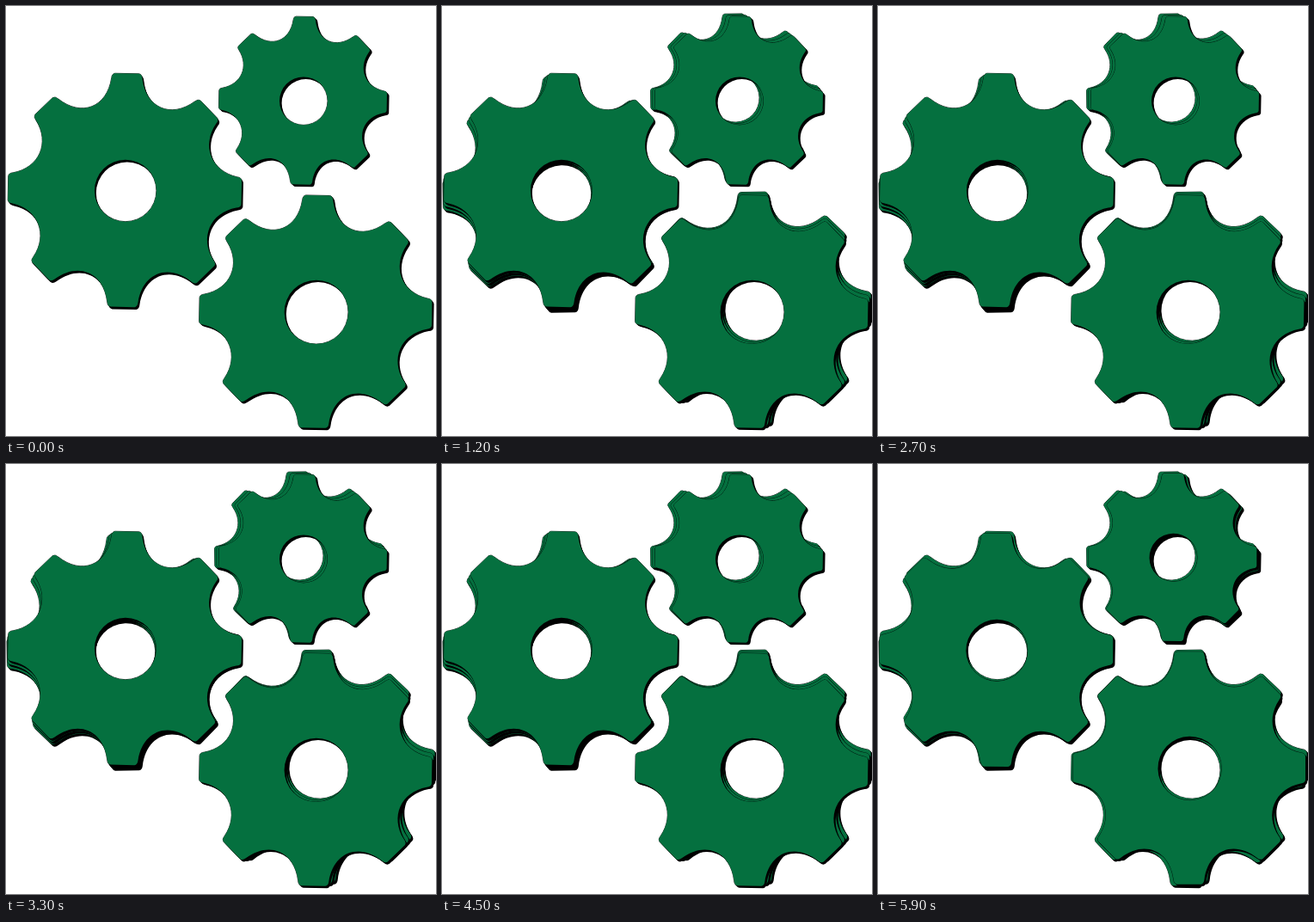
Recreate the animation shown at these times as an HTML page with a canvas. Size 500 by 500 pixels, loop 6 s.

```html
<!DOCTYPE html>
<html lang="en">
<head>
<meta charset="utf-8">
<title>Gears</title>
<style>
  html, body { margin: 0; height: 100%; overflow: hidden; background: #fff; }
  canvas { display: block; }
</style>
</head>
<body>
<canvas id="stage" width="500" height="500"></canvas>
<script>
const ctx = document.getElementById('stage').getContext('2d');
const STEP = 100, LOOP = 6000;
const ANGLES = [0, -2, -1];
const TEETH = 8, TILT = 1.1;
const rad = deg => deg * Math.PI / 180;

// Outline of a gear with a round hole; the profile is laid out for radius 136.5.
function gearPath(cx, cy, radius, hole) {
  const path = new Path2D(), scale = radius / 136.5;
  const at = (deg, along, side) => {
    const a = rad(deg), s = Math.sin(a), c = Math.cos(a);
    return [cx + scale * (along * s + side * c), cy + scale * (side * s - along * c)];
  };
  for (let i = 0; i < TEETH; i++) {
    const tooth = TILT + i * 360 / TEETH, valley = tooth + 180 / TEETH;
    // The valleys at the left and right are a little shallower.
    const depth = 97 + 6 * Math.sin(rad(valley)) ** 2;
    if (!i) path.moveTo(...at(tooth, 131, -18));
    path.quadraticCurveTo(...at(tooth, 136, -17.5), ...at(tooth, 136.5, -14));
    path.lineTo(...at(tooth, 136.5, 14));
    path.quadraticCurveTo(...at(tooth, 136, 17.5), ...at(tooth, 131, 18));
    path.bezierCurveTo(...at(valley, depth, -16), ...at(valley, depth, 16),
      ...at(tooth + 360 / TEETH, 131, -18));
  }
  path.closePath();
  path.moveTo(cx + hole + 0.8, cy + 0.5);
  path.arc(cx + 0.8, cy + 0.5, hole, 0, 2 * Math.PI);
  return path;
}

const gears = [
  { path: gearPath(138.1, 214.2, 135.7, 36), dx: 1.9, dy: 2.8 },
  { path: gearPath(345.2, 109.9, 97.6, 28), dx: 2.6, dy: 2.6 },
  { path: gearPath(360, 355.4, 135.2, 37.2), dx: 2.2, dy: 2.4 }
];

function drawPose(deg) {
  ctx.save();
  ctx.translate(250, 250);
  ctx.rotate(rad(deg));
  ctx.translate(-250, -250);
  for (const { path, dx, dy } of gears) {
    ctx.fillStyle = ctx.strokeStyle = '#000';
    for (let k = 1; k <= 3; k++) {
      ctx.save();
      ctx.translate(dx * k / 3, dy * k / 3);
      ctx.fill(path, 'evenodd');
      ctx.restore();
    }
    ctx.lineWidth = 0.8;
    ctx.stroke(path);
    ctx.fillStyle = '#05703f';
    ctx.fill(path, 'evenodd');
  }
  ctx.restore();
}

// Each pose is painted over the earlier ones; three cover a full cycle.
function draw(time) {
  const step = Math.floor(time % LOOP / STEP);
  ctx.fillStyle = '#fff';
  ctx.fillRect(0, 0, 500, 500);
  for (let s = Math.max(0, step - 2); s <= step; s++) drawPose(ANGLES[s % 3]);
}

const start = performance.now();
function tick() {
  draw(performance.now() - start);
  requestAnimationFrame(tick);
}
tick();
</script>
</body>
</html>
```
